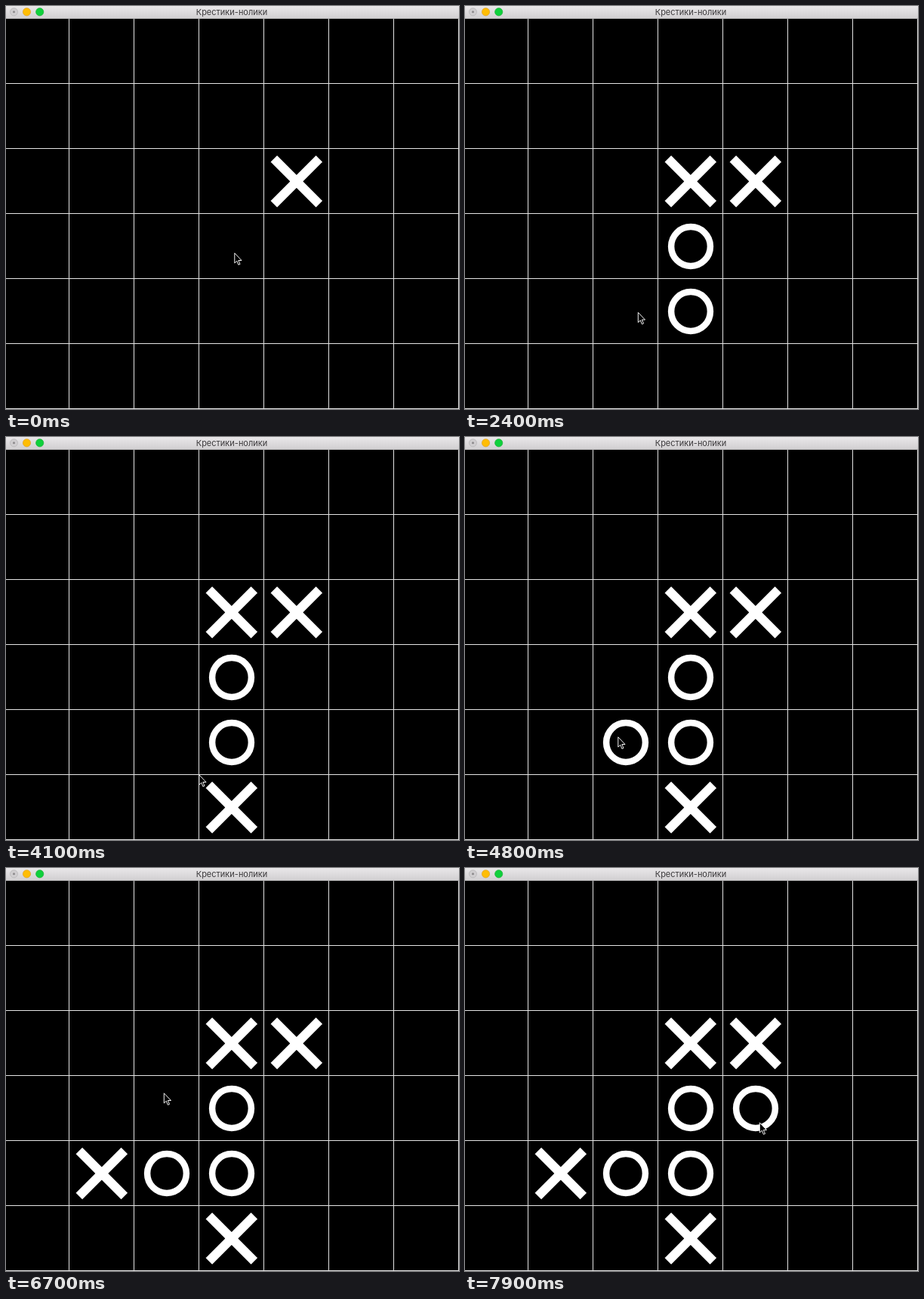
Recreate the animation shown at these times as an HTML page with a canvas. Size 600x533 px, loop 8 s.

```html
<!DOCTYPE html>
<html lang="ru">
<head>
<meta charset="utf-8">
<title>Крестики-нолики</title>
<style>
  html, body { margin: 0; width: 100%; height: 100%; overflow: hidden; background: #000; }
  canvas { display: block; }
</style>
</head>
<body>
<canvas id="stage" width="600" height="533"></canvas>
<script>
const ctx = document.getElementById('stage').getContext('2d');
const LOOP = 8000, STEP = 50, CELL = 86;

// kind, column, row, time of the move
const moves = [
  ['x', 4, 2, 0], ['o', 3, 3, 200], ['x', 3, 2, 800], ['o', 3, 4, 1750],
  ['x', 3, 5, 3550], ['o', 2, 4, 4800], ['x', 1, 4, 5950], ['o', 4, 3, 7900]
];

// Pointer strokes: each eases through its points, then rests
const strokes = [
  { from: 350, to: 720, points: [[302, 326], [298, 285], [294, 237]] },
  { from: 850, to: 1600, points: [[294, 237], [287, 262, 1150], [281, 291, 1200], [273, 340, 1320], [308, 410]] },
  { from: 1950, to: 2800, points: [[308, 410], [228.5, 404.5, 2400], [213, 402]] },
  { from: 2950, to: 3400, points: [[213, 402], [248, 442], [299, 489]] },
  { from: 3700, to: 4500, points: [[299, 489], [255, 446], [202, 396]] },
  { from: 4950, to: 5750, points: [[202, 396], [218, 498], [122, 425]] },
  { from: 5950, to: 6700, points: [[122, 425], [165, 360], [208.5, 297]] },
  { from: 6750, to: 7600, points: [[208.5, 297], [285, 390], [386, 336]] },
  { from: 7600, to: 7700, points: [[386, 336], [389.5, 336]] }
];

const smooth = u => u * u * (3 - 2 * u);
const mix = (a, b, u) => a + (b - a) * u;

function pointerAt(t) {
  let stroke = strokes[0];
  for (const s of strokes) if (t >= s.from) stroke = s;
  const { from, to, points } = stroke;
  const last = points.length - 1;
  const timeOf = i => i === 0 ? from : i === last ? to : points[i][2] || mix(from, to, i / last);
  if (t <= from) return points[0];
  if (t >= to) return points[last];
  let i = 0;
  while (t >= timeOf(i + 1)) i++;
  let u = (t - timeOf(i)) / (timeOf(i + 1) - timeOf(i));
  if (last === 1) u = smooth(u);
  else if (i === 0) u = u * (1 + u) / 2;
  else if (i === last - 1) u = 1 - (1 - u) * (2 - u) / 2;
  return [0, 1].map(k => mix(points[i][k], points[i + 1][k], u));
}

function line(x1, y1, x2, y2) {
  ctx.beginPath();
  ctx.moveTo(x1, y1);
  ctx.lineTo(x2, y2);
  ctx.stroke();
}

function disc(x, y, r, fill, edge) {
  ctx.beginPath();
  ctx.arc(x, y, r, 0, Math.PI * 2);
  ctx.fillStyle = fill;
  ctx.fill();
  if (edge) {
    ctx.strokeStyle = edge;
    ctx.lineWidth = 0.7;
    ctx.stroke();
  }
}

function drawGrid() {
  ctx.fillStyle = '#000';
  ctx.fillRect(0, 0, 600, 533);
  ctx.strokeStyle = '#e4e4e4';
  ctx.lineWidth = 1;
  for (let x = 83.5; x < 600; x += CELL) line(x, 17, x, 533);
  for (let y = 102.5; y < 533; y += CELL) line(0, y, 600, y);
}

function drawTitleBar() {
  const shade = ctx.createLinearGradient(0, 0, 0, 16);
  shade.addColorStop(0, '#e9e7e9');
  shade.addColorStop(1, '#d1cfd1');
  ctx.fillStyle = shade;
  ctx.fillRect(0, 0, 600, 16);
  ctx.fillStyle = '#b5b3b5';
  ctx.fillRect(0, 16, 600, 1);
  disc(10.5, 7.8, 5, '#d0ced0', '#b4b2b4');
  disc(10.5, 7.8, 1.5, '#8c8a8c');
  disc(27.5, 7.8, 5.1, '#ffbd05', '#dfa023');
  disc(44.7, 7.8, 5.1, '#0fd03c', '#17ad32');
  ctx.fillStyle = '#3c3a3c';
  ctx.font = '11px Inter, Roboto, sans-serif';
  ctx.textAlign = 'center';
  ctx.fillText('Крестики-нолики', 299, 12);
}

function drawMark(kind, col, row) {
  const x = 41 + CELL * col, y = 60 + CELL * row;
  ctx.strokeStyle = '#fff';
  if (kind === 'x') {
    ctx.lineWidth = 12;
    line(x - 30.2, y - 30, x + 29.8, y + 30);
    line(x + 29.8, y - 30, x - 30.2, y + 30);
  } else {
    ctx.lineWidth = 8.5;
    ctx.beginPath();
    ctx.arc(x, y, 25.9, 0, Math.PI * 2);
    ctx.stroke();
  }
}

const arrow = new Path2D('M0 0V13.2L3 10.4L5.1 15.5L7.2 14.6L5 9.7H9.2Z');

function drawPointer([x, y]) {
  ctx.save();
  ctx.translate(x + 0.8, y + 0.8);
  ctx.fillStyle = '#000';
  ctx.fill(arrow);
  ctx.strokeStyle = '#f2f2f2';
  ctx.lineWidth = 1;
  ctx.stroke(arrow);
  ctx.restore();
}

function frame(now) {
  const t = Math.floor(now % LOOP / STEP) * STEP;
  drawGrid();
  drawTitleBar();
  for (const [kind, col, row, at] of moves) if (t >= at) drawMark(kind, col, row);
  drawPointer(pointerAt(t));
}

const start = performance.now();
function tick() {
  frame(performance.now() - start);
  requestAnimationFrame(tick);
}
tick();
</script>
</body>
</html>
```
